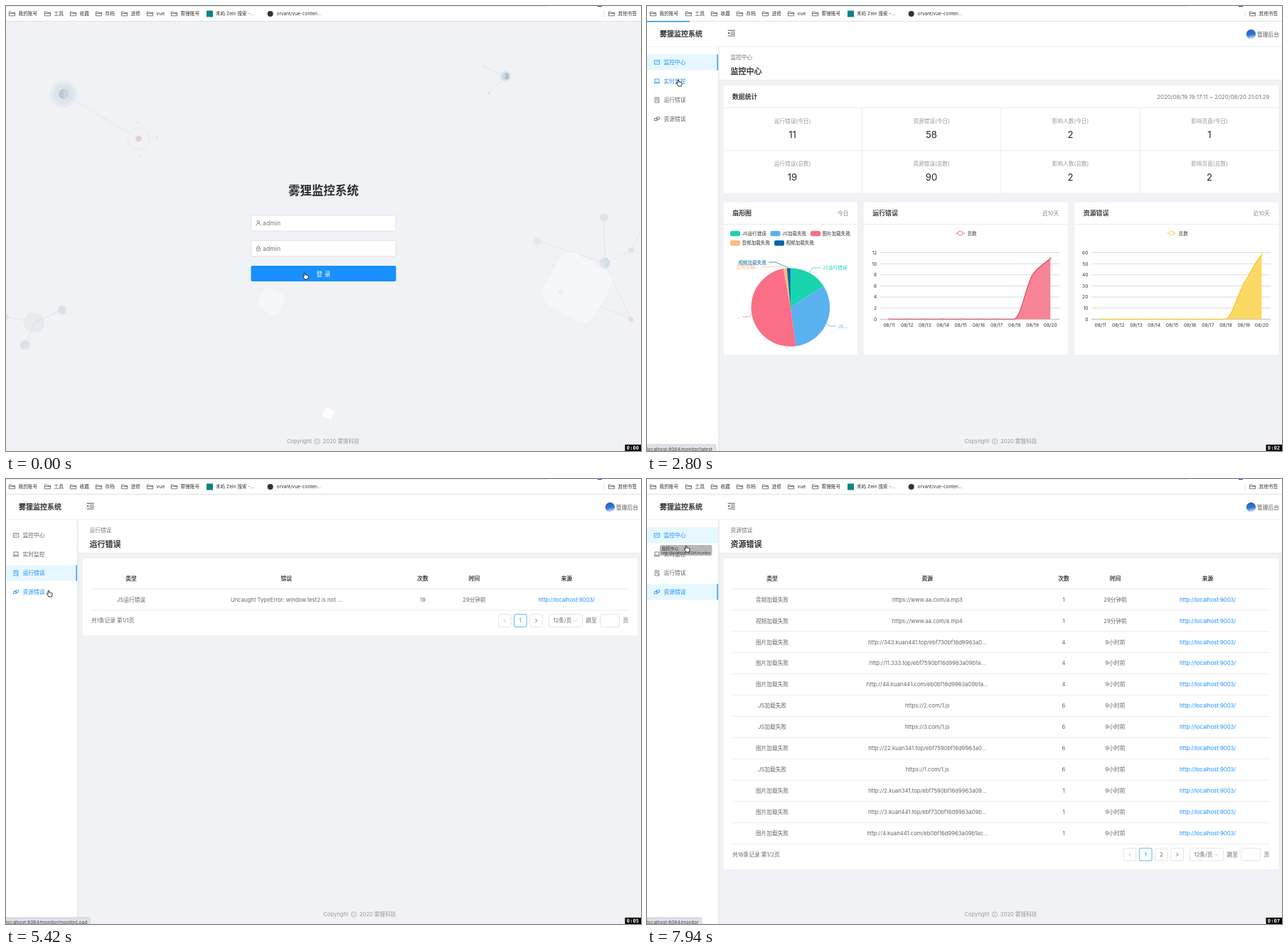
These frames come from a looping animation (893 by 627 pixels, 8 s). An HTML page:

```html
<!DOCTYPE html>
<html lang="zh-CN">
<head>
<meta charset="utf-8">
<title>监控系统</title>
<style>
html, body { margin: 0; width: 100%; height: 100%; overflow: hidden; background: #f0f2f5; }
svg { display: block; width: 893px; height: 627px; font-family: Inter, "Noto Sans CJK SC", "Noto Sans CJK", sans-serif; font-feature-settings: "calt" 0; }
text { white-space: pre; }
</style>
</head>
<body>
<svg id="stage" viewBox="0 0 893 627" xmlns="http://www.w3.org/2000/svg"></svg>
<script>
const BLUE = '#1890ff', INK = '#262626', BODY = '#666', MUTED = '#999', EDGE = '#e8e8e8';
const LOOP = 8000;

// Drawing helpers; text is placed by its vertical middle, medium weight gets a hairline stroke
const text = (x, y, s, size = 7.7, fill = BODY, anchor = 'start', weight = 400) =>
  `<text x="${x}" y="${y + size * .37}" font-size="${size}" fill="${fill}" text-anchor="${anchor}" font-weight="${weight}"` +
  `${weight === 500 ? ` stroke="${fill}" stroke-width="${size * .028}"` : ''}>${s}</text>`;
const mid = (x, y, s, size, fill, weight) => text(x, y, s, size, fill, 'middle', weight);
const end = (x, y, s, size, fill) => text(x, y, s, size, fill, 'end');
const title = (x, y, s, size) => text(x, y, s, size, INK, 'start', 500);
const rect = (x, y, w, h, fill, rx = 0, stroke = 'none') =>
  `<rect x="${x}" y="${y}" width="${w}" height="${h}" rx="${rx}" fill="${fill}" stroke="${stroke}" stroke-width=".7"/>`;
const path = (d, stroke, width = .7, fill = 'none') =>
  `<path d="${d}" fill="${fill}" stroke="${stroke}" stroke-width="${width}"/>`;
const line = (x1, y1, x2, y2, c = EDGE, w = .8) => path(`M${x1} ${y1}L${x2} ${y2}`, c, w);
const dot = (x, y, r, fill, stroke = 'none') =>
  `<circle cx="${x}" cy="${y}" r="${r}" fill="${fill}" stroke="${stroke}" stroke-width=".7"/>`;
const half = (x, y, r, fill) => path(`M${x} ${y - r}a${r} ${r} 0 0 1 0 ${2 * r}z`, 'none', 0, fill);
const tilted = (x, y, s, r, fill, deg) =>
  `<rect x="${x - s / 2}" y="${y - s / 2}" width="${s}" height="${s}" rx="${r}" fill="${fill}" transform="rotate(${deg} ${x} ${y})"/>`;
const group = (id, body) => `<g id="${id}">${body}</g>`;
const card = (x, y, r, b) => rect(x, y, r - x, b - y, '#fff', 1, '#ebebeb');

const footer = x => text(x - 51.5, 613.5, 'Copyright', 7.5, MUTED) + dot(x - 9, 613.5, 3.6, 'none', MUTED) +
  mid(x - 9, 613.5, 'c', 5, MUTED) + text(x - 1, 613.5, '2020 雾狸科技', 7.6, MUTED);

function bookmarks() {
  const folder = x => path(`M${x + .4} 13.8v-5.6h3l1 1.1h4.2v4.5zM${x + .4} 10.6h8.2`, '#555', .8);
  const items = [[4, '我的账号'], [54, '工具'], [90, '收藏'], [126, '存档'], [162, '进修'], [198, 'vue'], [232, '雾狸账号'], [847, '其他书签']];
  return rect(0, 0, 893, 21, '#fff') + line(0, .3, 760, .3, '#ddd') + rect(832, 0, 6, 1.2, '#7a35c8') +
    line(0, 21.4, 893, 21.4, '#dcdcdc') + line(841, 6, 841, 16, '#ddd') +
    items.map(([x, s]) => folder(x) + text(x + 13.5, 11, s, 6.7, '#333')).join('') +
    rect(282, 6.5, 9, 9, '#0c8484') + text(295, 11, '禾屿 Zeln 搜索 -...', 6.6, '#333') +
    dot(371.7, 11, 4, '#333') + text(380.5, 11, 'orvant/vue-conten...', 6.5, '#333');
}

function login() {
  const L = '#dfe3e9', pale = '#e5e9ee', soft = '#dfe4eb', glow = '#f6f7f8';
  const field = (y, icon) => rect(344.8, y, 203.4, 22, '#fff', 2, '#d9d9d9') + icon + text(361, y + 11, 'admin', 8.7, '#777');
  const deco =
    dot(81, 124, 19, '#e7eaee') + dot(81, 124, 14, '#dde4eb') + dot(81, 124, 7, '#bac8d6') + half(81, 124, 7, '#cad5e0') +
    line(88, 128, 182, 184, L) + dot(186.5, 187, 15.5, 'none', '#e3e3e8') + dot(186.5, 187, 4.3, '#edcdd0') +
    dot(185, 163.5, 1.3, '#dfe0e2') + dot(212, 185, 1.3, '#dfdfe6') + dot(189, 211.5, 1.1, '#e0e0e4') +
    line(674, 86, 698, 97, L) + line(698, 104, 680, 122, L) + dot(672.5, 85.5, 2, '#f0f2f5', L) + dot(679.3, 122.8, 1.7, '#efe2ad') +
    dot(702.5, 99, 7.5, '#e0e5eb') + dot(702.5, 99, 5, '#cbd8e4') + half(702.5, 99, 5, '#a9bfd3') +
    line(841, 298, 842, 356, L) + line(747, 331, 836, 360, L) + line(842, 362, 879, 441, L) + line(842, 362, 879, 344, pale) +
    line(879, 344, 893, 317, L) + line(879, 344, 893, 348, pale) + line(800, 410, 879, 441, L) +
    dot(841, 298, 5.8, soft) + dot(747.5, 331, 5.3, pale) + dot(879, 344, 4, soft) + dot(879, 441.5, 3.3, '#ecd8dc') +
    tilted(803, 396.5, 82, 18, glow, 30) + dot(842, 362, 7.5, '#dee4eb') + half(842, 362, 7.5, '#d5dee7') + dot(780.5, 402.5, 3.3, '#ebedef') +
    tilted(373, 416, 32, 7, glow, 30) + tilted(453.5, 574, 14, 2, '#fff', 28) +
    line(39, 446, 0, 438, L) + dot(39.5, 446, 14.5, '#e7eaee') + line(39, 446, 79, 428, '#d6dde5') + line(39, 446, 27, 478, L) +
    dot(79, 428.5, 6, '#d9e0e9') + dot(26.5, 477.5, 7, '#dee3ea') + dot(0, 438, 3.7, '#dde2e9');
  const user = dot(355, 304.3, 1.8, 'none', '#666') + path('M352 309.6c.3-4.4 5.7-4.4 6 0', '#666');
  const lock = rect(352.3, 341, 5.4, 4, 'none', .5, '#666') + path('M353.4 341v-1.3c0-2.2 3.2-2.2 3.2 0v1.3M355 342.3v1.4', '#666');
  return rect(0, 21.8, 893, 606, '#f0f2f5') + deco + mid(446.5, 260, '雾狸监控系统', 16.5, '#2c2d30', 600) +
    field(295, user) + field(330.6, lock) + rect(344.5, 366, 204, 22, BLUE, 2) + mid(446.5, 377.3, '登 录', 8.7, '#fff') + footer(446.5);
}

const MENU = ['监控中心', '实时监控', '运行错误', '资源错误'];
const menuY = i => 79.3 + i * 26.6;
const ICONS = [
  'M-3.7-2.8h7.4v5.6h-7.4zM-2.2 1l1.6-2 1.2 1.2 1.8-1.9',
  'M-3-3h6v4.5h-6zM-3.9 3h7.8M-3 1.5l-.9 1.5M3 1.5l.9 1.5',
  'M-2.8-3.6h5.6v7.2h-5.6zM-1.5-1.8h3M-1.5 0h3M.8 2h1.9',
  'M-.8-2.4h4.4v3h-4.4zM-3.6-.6h4.4v3h-4.4z'
];

function shell() {
  const items = MENU.map((s, i) => {
    const y = menuY(i);
    return `<rect id="bg${i}" x="0" y="${y - 11.2}" width="99.8" height="22.4" fill="#e6f7ff"/>` +
      `<rect id="bar${i}" x="98.5" width="1.3" fill="${BLUE}"/>` +
      `<g id="item${i}"><path d="${ICONS[i]}" transform="translate(14 ${y})" fill="none" stroke="currentColor" stroke-width=".8"/>` +
      text(23.5, y, s, 7.75, 'currentColor') + '</g>';
  }).join('');
  const heads = MENU.map((s, i) => group('head' + i, text(117.5, 71.8, s, 7.7, '#777') + title(117.5, 92, s, 11))).join('');
  return rect(100, 21.8, 793, 606, '#f0f2f5') + rect(100, 57, 793, 47.3, '#fff') + line(100, 104.5, 893, 104.5) +
    rect(100, 21.8, 793, 35, '#fff') + line(0, 57.3, 893, 57.3, '#efefef') +
    rect(100, 57, 1.8, 570, '#e9ebee') + rect(0, 21.8, 100, 606, '#fff') + line(0, 57.3, 100, 57.3, '#f0f0f0') +
    title(18, 39.3, '雾狸监控系统', 10) +
    path('M113.7 34.3h10.2M117.5 36.9h6.4M117.5 39.5h6.4M113.7 42.1h10.2', '#444', .9) + path('M116 36.5v3.4l-2.3-1.7z', 'none', 0, '#444') +
    dot(849.5, 39.7, 6.7, 'url(#sky)') + text(858, 39.7, '管理后台', 7.75, '#555') + items + heads + footer(498);
}

// Dashboard
const polar = (deg, r) => {
  const a = deg * Math.PI / 180;
  return `${201.8 + r * Math.sin(a)} ${424.5 - r * Math.cos(a)}`;
};
const sector = (a, b, r) => `M201.8 424.5L${polar(a, r)}A${r} ${r} 0 ${b - a > 180 ? 1 : 0} 1 ${polar(b, r)}z`;

// name, count, colour, legend x y, leader line, label x y text
const PIE = [
  ['JS运行错误', 11, '#19d4ae', 117, 320.6, 'L233 369H244', 247, 369, 'JS运行错误'],
  ['JS加载失败', 22, '#5ab1ef', 173.5, 320.6, 'L258 451H266', 268.5, 451.5, 'JS...'],
  ['图片加载失败', 34, '#fa6e86', 230, 320.6, 'L143.5 438H134', 132, 437.5, '...'],
  ['音频加载失败', 1, '#ffb980', 117, 334, 'L190 367.5H161', 157.5, 367.5, '音频加载...'],
  ['视频加载失败', 1, '#0067a6', 179, 334, 'L181 361H171', 168, 361.3, '视频加载失败']
];

function pie() {
  const unit = 360 / 69;
  let a = 0;
  return PIE.map(([, n, c, , , tail, x, y, label]) => {
    const b = a + n * unit;
    const out = path(sector(a, b, 55.3), 'none', 0, c) + path(`M${polar((a + b) / 2, 55.3)}${tail}`, c) +
      text(x, y, label, 6.6, c, x > 200 ? 'start' : 'end');
    a = b;
    return out;
  }).join('');
}

function lineChart(x0, peak, vals, color, fill, clip) {
  const base = 441.3, step = 25.2, top = peak / 6;
  const X = i => x0 + 12.8 + i * step, Y = v => base - v * 93.8 / peak;
  const [v9, v10] = vals, dy = (Y(v10) - base) * .21;
  const curve = `L${X(7)} ${base}C${X(7) + 10} ${base - 6} ${X(8) - 10} ${Y(v9) - dy} ${X(8)} ${Y(v9)}` +
    `C${X(8) + 8} ${Y(v9) + dy * .65} ${X(9) - 8} ${Y(v10) + 8} ${X(9)} ${Y(v10)}`;
  let out = '';
  for (let i = 0; i < 7; i++) {
    const y = Y(i * top);
    out += line(x0, y, x0 + 252.5, y, i ? '#ccc' : '#999', .7) + end(x0 - 4.5, y, i * top, 6.6, '#333');
  }
  let marks = '';
  for (let i = 0; i < 10; i++) {
    out += mid(X(i), 449.2, '08/' + (11 + i), 6.7, '#333');
    marks += dot(X(i), Y(i < 8 ? 0 : vals[i - 8]), 1.1, '#fff', color);
  }
  const lx = x0 + 112.8;
  return out + `<g clip-path="url(#${clip})">` + path(`M${X(0)} ${base}${curve}V${base}z`, 'none', 0, fill) +
    path(`M${X(0)} ${base}${curve}`, color, 1.1) + marks + '</g>' +
    line(lx - 6.5, 320.2, lx + 6.5, 320.2, fill, 1.2) + dot(lx, 320.2, 3.2, '#fff', color) + text(lx + 10, 320.2, '总数', 6.6, '#333');
}

function dashboard() {
  const labels = ['运行错误', '资源错误', '影响人数', '影响页面'];
  const counts = [[11, 58, 2, 1], [19, 90, 2, 2]];
  let out = card(107, 111.5, 889, 264) + title(120, 127.8, '数据统计', 8.9) +
    end(875.5, 127.8, '2020/08/19 19:17:11 ~ 2020/08/20 21:01:29', 7.85, '#777') + line(107, 143.2, 889, 143.2) + line(107, 203.7, 889, 203.7);
  labels.forEach((s, i) => {
    const x = 204.5 + i * 195.5;
    if (i) out += line(x - 97.7, 143, x - 97.7, 264);
    counts.forEach((row, j) => {
      out += mid(x, 162 + j * 60.4, `${s}(${j ? '总数' : '今日'})`, 7.7, MUTED) + mid(x, 181 + j * 60.2, row[i], 13.1, INK);
    });
  });
  for (const [l, r, name, note] of [[107, 296.5, '扇形图', '今日'], [304, 592.5, '运行错误', '近10天'], [600.5, 889, '资源错误', '近10天']])
    out += card(l, 276, r, 492) + line(l, 307.5, r, 307.5) + title(l + 13.3, 292, name, 8.9) + end(r - 13.2, 292, note, 7.7, '#888');
  out += PIE.map(([s, , c, x, y]) => rect(x, y - 3.7, 14, 7.4, c, 2) + text(x + 16.5, y, s, 6.6, '#333')).join('');
  return out + group('charts', group('pie', pie()) +
    lineChart(327.7, 12, [8, 11], '#e0405c', '#f78396', 'wipeA') + lineChart(624.8, 60, [32, 58], '#f3c51f', '#fcd864', 'wipeB'));
}

// Tables
const ROW = 29.95;
function table(cols, heads, rows, top, links) {
  const put = (s, i, y, fill, w) => mid(cols[i], y, s, 7.7, fill, w);
  let out = heads.map((s, i) => put(s, i, top - 15, INK, 500)).join('') + line(120, top, 876, top);
  rows.forEach((row, r) => {
    const y = top + 15 + r * ROW;
    out += row.map((s, i) => put(s, i, y, links.includes(i) ? BLUE : BODY)).join('') + line(120, y + 15, 876, y + 15);
  });
  return out;
}

function pager(y, info, pages, start) {
  const arrow = (x, d, c) => path(`M${x - d} ${y - 2.5}l${2 * d} 2.5l${-2 * d} 2.5`, c, .9);
  const box = (x, c = '#d9d9d9') => rect(x - 8.8, y - 8.8, 17.6, 17.6, '#fff', 2, c);
  let out = text(120, y - .3, info, 7.7) + box(start) + arrow(start, -1.2, '#bbb');
  pages.forEach((p, i) => {
    const x = start + 22.2 * (i + 1);
    out += p === '•••' ? mid(x, y, p, 6, '#bbb') : box(x, i ? '#d9d9d9' : BLUE) + mid(x, y, p, 7.7, i ? BODY : BLUE);
  });
  return out + box(745.6) + arrow(745.6, 1.2, '#666') + rect(763.5, y - 8.8, 47, 17.6, '#fff', 2, '#d9d9d9') +
    text(769.5, y, '12条/页', 7.7) + path(`M798.5 ${y - 1}l2.3 2.3l2.3-2.3`, '#bbb') +
    text(815.5, y, '跳至', 7.7) + rect(835.5, y - 8.8, 27, 17.6, '#fff', 2, '#d9d9d9') + text(867.5, y, '页', 7.7);
}

const HOST = 'http://localhost:9003/', TEST = 'Uncaught TypeError: window.test2 is not ...';
const IMG = '图片加载失败', JS = 'JS加载失败', RUN = 'JS运行错误', AUDIO = '音频加载失败', VIDEO = '视频加载失败';
const U343 = 'http://343.kuan441.top/ebf730bf16d9963a0...', U22 = 'http://22.kuan341.top/ebf7590bf16d9963a0...';
const U44 = 'http://44.kuan441.com/eb0bf16d9963a09b1a...', MP3 = 'https://www.aa.com/a.mp3', MP4 = 'https://www.aa.com/a.mp4';
const H9 = '9小时前', M29 = '29分钟前';
const lib = n => `https://${n}.com/1.js`;

function livePage() {
  const rows = [[IMG, U343], [IMG, U22], [IMG, U44], [AUDIO, MP3], [VIDEO, MP4], [RUN, TEST], [JS, lib(1)], [JS, lib(2)], [JS, lib(3)], [IMG, U22], [RUN, TEST], [JS, lib(1)]]
    .map(([kind, msg]) => ['测试项目002', '61d1tevhr71c0000', kind, msg,
      kind === RUN ? 'TypeError: window.test2 is not a functio...' : 'no stack', M29, HOST]);
  const tabs = ['002', '004', '003', '001'].map((n, i) => text(182.3 + i * 86.9, 128, '测试项目' + n, 8.8)).join('');
  return card(107, 111.5, 889, 581) + line(107, 142.3, 889, 142.3) + rect(120, 141.2, 36, 1.5, BLUE) +
    mid(138, 128, '全部', 8.8, BLUE, 500) + tabs +
    table([153, 232.5, 313, 444, 630.5, 745, 823], ['项目', '用户', '类型', '错误', '详情', '时间', '来源'], rows, 184.7, [1, 6]) +
    pager(558.8, '共109条记录 第1/10页', [1, 2, 3, 4, 5, '•••', 10], 568.2);
}

function listPage(what, rows, info, pages) {
  const bottom = 154.8 + rows.length * ROW;
  return card(107, 111.5, 889, bottom + 36.5) +
    table([176, 394.3, 586, 658.5, 788.5], ['类型', what, '次数', '时间', '来源'], rows.map(r => [...r, HOST]), 154.8, [4]) +
    pager(bottom + 14.8, info, pages, 723.4 - 22.2 * pages.length);
}
const runPage = () => listPage('错误', [[RUN, TEST, 19, M29]], '共1条记录 第1/1页', [1]);
const loadPage = () => listPage('资源', [
  [AUDIO, MP3, 1, M29], [VIDEO, MP4, 1, M29], [IMG, U343, 4, H9],
  [IMG, 'http://11.333.top/ebf7590bf16d9963a09b1a...', 4, H9], [IMG, U44, 4, H9],
  [JS, lib(2), 6, H9], [JS, lib(3), 6, H9], [IMG, U22, 6, H9], [JS, lib(1), 6, H9],
  [IMG, 'http://2.kuan341.top/ebf7590bf16d9963a09...', 1, H9],
  [IMG, 'http://3.kuan441.top/ebf730bf16d9963a09b...', 1, H9],
  [IMG, 'http://4.kuan441.com/eb0bf16d9963a09b1ac...', 1, H9]
], '共18条记录 第1/2页', [1, 2]);

const HAND = 'M-.9.9c0-1.2 1.6-1.2 1.7 0l.2 2.3c.4-.5 1.3-.4 1.5.2c.5-.4 1.3-.2 1.4.4c.8-.3 1.3.2 1.3.9c0 2-.6 2.6-1 4.3h-4.2c-.4-1.4-1.7-2.3-2.5-3.6c-.5-1 .5-1.5 1.6-.3z';
const ARROW = 'M0 0v8.3l1.9-1.8l1.3 3l1.3-.6l-1.3-2.9h2.7z';

const stage = document.getElementById('stage');
stage.innerHTML = `<defs>
  <linearGradient id="sky" x1=".4" y1="0" x2=".6" y2="1"><stop offset="0" stop-color="#2a5fc0"/><stop offset=".55" stop-color="#2f78d6"/><stop offset="1" stop-color="#e4eef8"/></linearGradient>
  <clipPath id="fan"><path id="fanPath"/></clipPath>
  <clipPath id="wipeA"><rect id="wipeRectA" x="326" y="340" height="110"/></clipPath>
  <clipPath id="wipeB"><rect id="wipeRectB" x="623" y="340" height="110"/></clipPath></defs>` +
  group('login', login()) + group('shell', shell()) +
  [dashboard, livePage, runPage, loadPage].map((f, i) => group('page' + i, f())).join('') + bookmarks() +
  `<rect id="load" x="0" y="21" height="1.5" fill="#1a96e0"/>` +
  group('status', `<rect id="pill" x="-3" y="617.8" height="12" rx="2" fill="#dee1e6" stroke="#bfc3c9" stroke-width=".6"/><text id="link" x="0" y="626.7" font-size="6.6" fill="#444"></text>`) +
  group('ghost', rect(18, 93, 73.5, 15, 'rgba(140,140,140,.62)', 3) + text(20.5, 98, '监控中心', 6, '#333') + text(20, 104, 'http://localhost:8084/monitor', 5, '#444')) +
  group('cursor', `<path id="hand" d="${HAND}" fill="#fff" stroke="#111" stroke-width=".9"/><path id="arrow" d="${ARROW}" fill="#000" stroke="#fff" stroke-width=".6"/>`) +
  rect(870.5, 618, 23, 9, '#000') +
  '<text id="clock" x="881.5" y="624.8" font-size="7.2" font-weight="700" fill="#fff" text-anchor="middle" font-family="\'DejaVu Sans Mono\', monospace"></text>';

const el = {};
stage.querySelectorAll('[id]').forEach(n => el[n.id] = n);
const show = (id, on) => el[id].style.display = on ? '' : 'none';
const set = (id, attrs) => { for (const k in attrs) el[id].setAttribute(k, attrs[k]); };

// The screen refreshes at these moments
const TICKS = [0, 150, 300, 450, 600, 780, 960, 1140, 1320, 1470, 1620, 1770, 1920, 2070, 2200, 2350, 2500,
  2800, 2950, 3090, 3190, 3370, 3550, 3700, 3850, 4000, 4150, 4270, 4400, 4550, 4700, 4850, 5030, 5160, 5290, 5420,
  5720, 5870, 6010, 6190, 6340, 6480, 6620, 6770, 6940, 7110, 7280, 7450, 7620, 7790, 7940];

// Linear track through [time, ...values]
function track(keys, t) {
  if (t <= keys[0][0]) return keys[0].slice(1);
  for (let i = 1; i < keys.length; i++) {
    const a = keys[i - 1], b = keys[i];
    if (t < b[0]) return a.slice(1).map((v, j) => v + (b[j + 1] - v) * (t - a[0]) / (b[0] - a[0]));
  }
  return keys[keys.length - 1].slice(1);
}

const POINTER = [[0, 420, 376], [300, 420, 376], [780, 66, 288], [960, 66, 288], [1770, 640, 127], [2350, 44, 104], [2800, 44, 104],
  [3090, 58, 139], [3700, 62, 142], [4550, 54.5, 130], [4850, 54.5, 131], [5420, 60, 157], [5720, 60, 157], [6010, 65, 163],
  [6620, 66, 160], [7450, 54, 78], [7790, 54, 82], [7940, 55, 94]];
const LOADS = [[[2800, 60], [2950, 480], [3090, 828], [3190, 893], [3370, 893]], [[4550, 60], [4700, 893], [4850, 893]], [[5720, 60], [5870, 893], [6010, 893]]];
const LINKS = [[2800, '/latest', 97], [4270, '/monitorJS', 111], [5160, '/monitorLoad', 118], [7280, '', 77]];
const STATES = [
  { on: [[450, 2950], [7280, LOOP]], bg: [[780, 0], [1140, 1], [2950, 1], [3190, 0], [7620, 0], [7790, 1]], bar: [[450, 0], [780, .62], [960, 1], [2800, 1], [2950, 0]] },
  { on: [[2500, 4700]], bg: [[2800, 0], [2950, 1], [4600, 1], [4850, 0]], bar: [[2800, 0], [2950, 1], [4400, 1], [4550, 0]] },
  { on: [[4400, 5870]], bg: [[4400, 0], [4550, .5], [4700, 1], [5720, 1], [6010, 0]], bar: [[4400, 0], [4550, .45], [4700, 1], [5720, 1], [5870, 0]] },
  { on: [[5160, LOOP]], bg: [[5720, 0], [5870, 1]], bar: [[5720, 0], [5870, 1]] }
];

function draw(t) {
  const page = [450, 2950, 4700, 5870].filter(s => t >= s).length - 1;
  show('login', page < 0);
  show('shell', page >= 0);
  STATES.forEach((s, i) => {
    show('page' + i, page === i);
    show('head' + i, page === i);
    const [bar] = track(s.bar, t);
    set('bg' + i, { opacity: track(s.bg, t)[0] });
    set('bar' + i, { y: menuY(i) - 11.2 * bar, height: 22.4 * bar, opacity: bar });
    el['item' + i].style.color = s.on.some(([a, b]) => t >= a && t < b) ? BLUE : BODY;
  });

  const p = Math.min(1, Math.max(0, (t - 960) / 950)), grow = 1 - (1 - p) ** 3;
  show('charts', t >= 960);
  set('fanPath', { d: sector(0, Math.min(359.9, 360 * grow), 90) });
  if (p < 1) set('pie', { 'clip-path': 'url(#fan)' });
  else el.pie.removeAttribute('clip-path');
  for (const k of 'AB') set('wipeRect' + k, { width: 258 * grow });

  const load = LOADS.find(k => t >= k[0][0] && t < k[k.length - 1][0]);
  set('load', { width: load ? track(load, t)[0] : 0 });

  const link = LINKS.filter(l => t >= l[0]).pop();
  show('status', link);
  if (link) {
    el.link.textContent = 'localhost:8084/monitor' + link[1];
    set('pill', { width: link[2] + 3 });
  }
  show('ghost', t >= 7940);

  const [x, y] = track(POINTER, t), hand = t < 450 || t >= 2350;
  set('cursor', { transform: `translate(${x} ${y})` });
  show('hand', hand);
  show('arrow', !hand);
  el.clock.textContent = '0:0' + Math.floor(t * .94 / 1000);
}

const began = performance.now();
function frame() {
  const t = (performance.now() - began) % LOOP;
  draw(TICKS.filter(k => k <= t).pop() || 0);
  requestAnimationFrame(frame);
}
frame();
</script>
</body>
</html>
```
